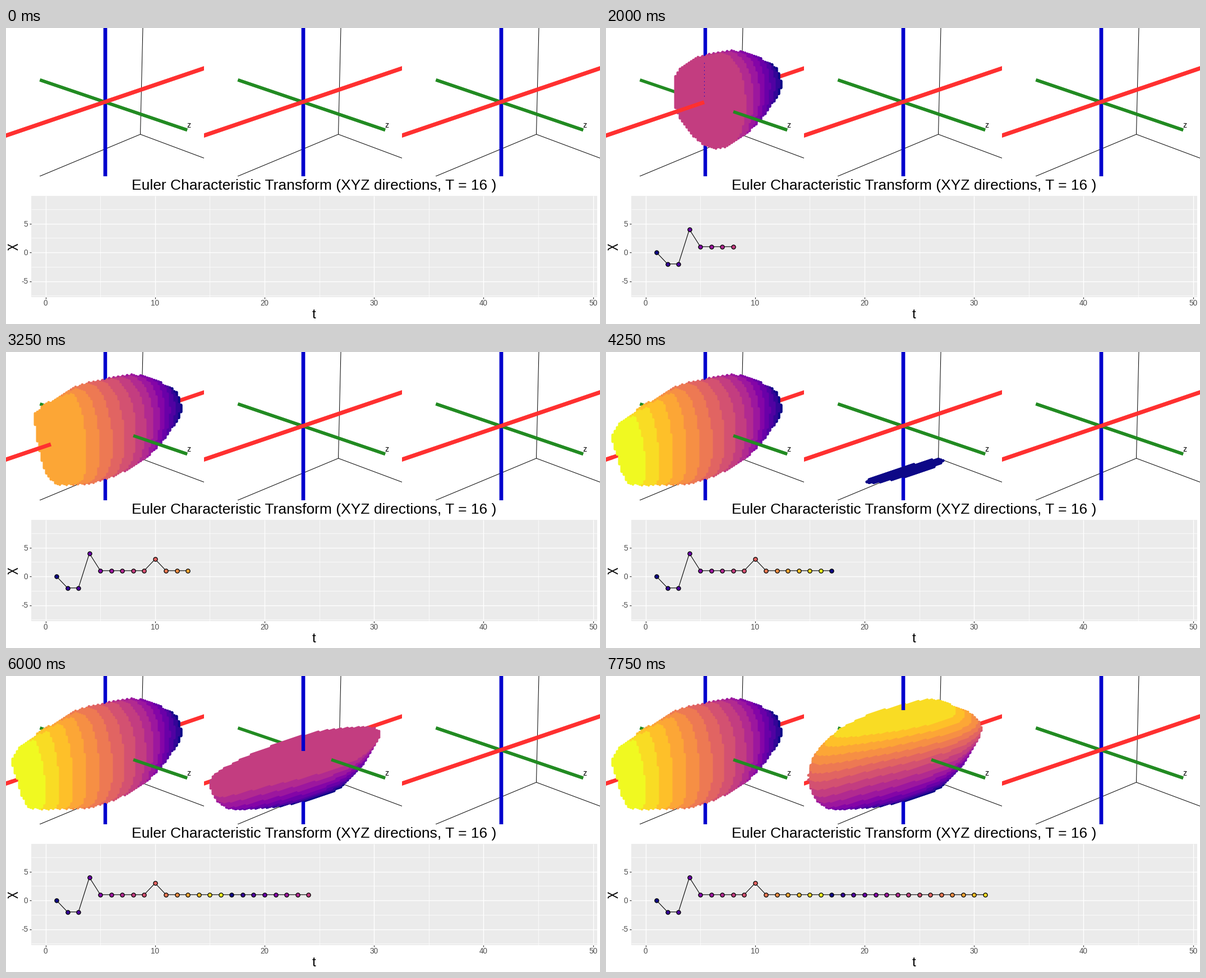
A matplotlib script for the animation above (8 s loop, 1059 by 529 pixels).

```python
import numpy as np
import matplotlib.pyplot as plt
from matplotlib.animation import FuncAnimation
from matplotlib.patches import Rectangle

W, H, DPI = 1059, 529, 64
PT = 72 / DPI                     # points per pixel
PANEL, TOP = 353, 265
STEPS, FRAMES = 16, 32
RED, BLUE, GREEN = "#FF3030", "#0000CD", "#228B22"
ORIGIN = np.array([176.5, 132.0])

plt.rcParams["font.family"] = "Liberation Sans"
plt.rcParams["path.simplify"] = False

fig = plt.figure(figsize=(W / DPI, H / DPI), dpi=DPI, facecolor="white")
ax = fig.add_axes([0, 0, 1, 1])
ax.set(xlim=(0, W), ylim=(H, 0))
ax.axis("off")


def line(x, y, color, px, z, clip=None, **kw):
    kw.setdefault("solid_capstyle", "butt")
    art, = ax.plot(x, y, color=color, lw=px * PT, zorder=z, **kw)
    if clip is not None:
        art.set_clip_path(clip)
    return art


def text(x, y, s, px, color="black", ha="center", **kw):
    kw.setdefault("va", "baseline")
    ax.text(x, y, s, fontsize=px * PT, color=color, ha=ha, zorder=30, **kw)


def shade(i):
    return plt.cm.plasma((i % STEPS) / (STEPS - 1))


# Slice outlines at a few heights, clockwise from the left end.
X_LEVELS = [1, 4, 8, 10, 13, 16]
X_SLICES = [
    [(274, 82), (280, 66), (290, 62), (301, 68), (309, 82), (313, 100),
     (309, 118), (300, 129), (288, 130), (278, 120), (274, 108), (273, 96)],
    [(196, 66), (208, 54), (230, 43), (258, 46), (279, 62), (287, 95),
     (285, 135), (272, 168), (240, 175), (208, 150), (194, 116), (200, 92)],
    [(124, 84), (150, 58), (178, 49), (208, 49), (230, 80), (240, 125),
     (238, 170), (222, 208), (184, 214), (150, 188), (123, 142), (135, 117)],
    [(91, 108), (104, 80), (126, 62), (158, 54), (183, 75), (198, 130),
     (200, 180), (184, 221), (150, 232), (115, 205), (94, 150), (93, 125)],
    [(50, 112), (74, 91), (92, 84), (110, 82), (122, 108), (129, 150),
     (131, 195), (124, 231), (92, 236), (69, 212), (57, 165), (53, 138)],
    [(12, 148), (20, 131), (30, 124), (40, 124), (48, 145), (54, 172),
     (58, 200), (55, 233), (42, 236), (27, 212), (20, 184), (12, 164)],
]
Y_LEVELS = [1, 3, 5, 10, 12, 15]
Y_SLICES = [
    [(109, 232), (132, 221), (167, 209), (207, 198), (237, 191), (250, 194),
     (239, 202), (217, 212), (187, 221), (152, 229), (125, 234)],
    [(45, 230), (67, 210), (127, 182), (197, 158), (257, 146), (285, 150),
     (275, 168), (243, 192), (192, 214), (137, 229), (72, 238)],
    [(27, 218), (47, 190), (117, 153), (197, 127), (267, 122), (297, 127),
     (290, 145), (252, 177), (192, 202), (117, 222), (47, 236)],
    [(12, 160), (39, 145), (107, 115), (192, 87), (267, 74), (307, 78),
     (313, 97), (277, 121), (207, 143), (127, 160), (22, 181)],
    [(19, 142), (42, 121), (117, 88), (192, 65), (252, 57), (295, 66),
     (302, 86), (262, 106), (202, 121), (127, 136), (35, 149)],
    [(61, 97), (77, 88), (122, 67), (187, 49), (227, 42), (261, 52),
     (259, 67), (237, 76), (197, 85), (142, 94), (77, 101)],
]


def hermite(p0, p1, m0, m1, s):
    return ((2 * s**3 - 3 * s**2 + 1) * p0 + (s**3 - 2 * s**2 + s) * m0
            + (3 * s**2 - 2 * s**3) * p1 + (s**3 - s**2) * m1)


def outline(levels, keys, n):
    """Smooth closed outline of the slice at height n."""
    levels = np.array(levels, float)
    keys = np.array(keys, float)
    n = np.clip(n, levels[0], levels[-1])
    i = min(np.searchsorted(levels, n, "right") - 1, len(levels) - 2)
    span = levels[i + 1] - levels[i]
    slope = np.gradient(keys, levels, axis=0) * span
    p = hermite(keys[i], keys[i + 1], slope[i], slope[i + 1],
                (n - levels[i]) / span)
    q = np.roll(p, -1, 0)
    m = (q - np.roll(p, 1, 0)) / 2
    s = np.linspace(0, 1, 10, endpoint=False)[None, :, None]
    curve = hermite(p[:, None], q[:, None], m[:, None],
                    np.roll(m, -1, 0)[:, None], s)
    return curve.reshape(-1, 2)


def grid_rows(curve, u, v):
    """Fill an outline with rows of grid dots running along u, stepped by v."""
    basis = np.array([u, v], float)
    a, b = (curve @ np.linalg.inv(basis)).T
    a2, b2 = np.roll(a, -1), np.roll(b, -1)
    rows = []
    for k in range(int(np.ceil(b.min())), int(b.max()) + 1):
        hit = (b <= k) != (b2 <= k)
        if not hit.any():
            continue
        cross = a[hit] + (a2 - a)[hit] * (k - b[hit]) / (b2 - b)[hit]
        lo, hi = np.ceil(cross.min()), np.floor(cross.max())
        if hi >= lo:
            ends = np.array([(lo, k), (hi + 0.01, k)]) @ basis
            rows += [*ends, (np.nan, np.nan)]
    return np.array(rows).reshape(-1, 2).T


def body(levels, keys, u, v, x0, clip):
    """One group of artists for each threshold, drawn back to front."""
    groups = []
    for n in range(1, STEPS + 1):
        group = []
        for part, h in enumerate((n - 0.5, n)):
            x, y = grid_rows(outline(levels, keys, h), u, v)
            group.append(line(x + x0, y, shade(n - 1), 5, 5 + n / 4 + part / 8,
                              clip, solid_capstyle="round", snap=False))
        groups.append(group)
    return groups


# Scene axes, as (x, y) ends relative to a panel.
AXES = {
    "blue": (BLUE, 6.4, (176.5, -10), (176.5, 275)),
    "green": (GREEN, 5.6, (60.5, 92.8), (323, 182.3)),
    "red": (RED, 7, (-10, 195.6), (363, 68.6)),
}


def on_axis(name, x):
    _, _, p, q = AXES[name]
    return p[1] + (q[1] - p[1]) * (x - p[0]) / (q[0] - p[0])


front = []
clips = []
for j in range(3):
    x0 = j * PANEL
    clip = Rectangle((x0, 0), PANEL, TOP, transform=ax.transData)
    clips.append(clip)
    for end in [(60, 265), (353, 232.5), (244, -1)]:
        line([x0 + 239.5, x0 + end[0]], [190, end[1]], "black", 1, 1, clip)
    parts = {}
    for i, (name, (color, px, p, q)) in enumerate(AXES.items()):
        xs, ys = [x0 + p[0], x0 + q[0]], [p[1], q[1]]
        line(xs, ys, color, px, 2 + i / 10, clip)
        parts[name] = line(xs, ys, color, px, 20 + i / 10, clip)
    front.append(parts)
    text(x0 + 325.5, 178, "z", 14)

specks = line([174.5, 174.5], [62, 126], BLUE, 1, 19, clips[0],
              linestyle=(0, (1.5, 5)))

bodies = [
    body(X_LEVELS, X_SLICES, (0, 4), (4, 1.37), 0, clips[0]),
    body(Y_LEVELS, Y_SLICES, (4, -1.36), (4, 1.37), PANEL, clips[1]),
]


def place(j, name, x_from, x_to):
    xs = np.array([x_from, x_to], float)
    front[j][name].set_data(xs + j * PANEL, on_axis(name, xs))


def pose_axes(j, n):
    """Keep in front only those parts of the axes the body does not cover."""
    past = n >= 8
    _, _, g0, g1 = AXES["green"]
    place(j, "green", 227 if past else g0[0], g1[0])
    if j == 0:
        end = np.interp(n, [1, 4, 8, 13, 16], [285, 237, 175, 80, 12])
        place(0, "red", -10, end if n else 363)
        front[0]["blue"].set_visible(not past)
        specks.set_visible(n == 8)
    elif j == 1:
        front[1]["red"].set_visible(not past)
        end = np.interp(n, [1, 5, 10, 15], [203, 163, 115, 61]) if n else 275
        front[1]["blue"].set_ydata([-10, end])


# Chart
def tx(t):
    return 70.6 + 19.52 * np.asarray(t)


def cy(c):
    return 401.1 - 10.28 * np.asarray(c)


L, R, T, B = 44.5, 1053.5, 300.3, 481.3
ax.add_patch(Rectangle((L, T), R - L, B - T, color="#EBEBEB", lw=0, zorder=1))
for t in range(0, 51, 5):
    line([tx(t)] * 2, [T, B], "white", 0.7 if t % 10 else 1.4, 2)
for c in np.arange(-7.5, 8, 2.5):
    line([L, R], [cy(c)] * 2, "white", 0.7 if c % 5 else 1.4, 2)
for t in range(0, 51, 10):
    line([tx(t)] * 2, [B, B + 3], "#333333", 1.2, 2)
    text(tx(t), 496.3, str(t), 13.5, "#4D4D4D")
for c in (-5, 0, 5):
    line([L - 3, L], [cy(c)] * 2, "#333333", 1.2, 2)
    text(39.5, cy(c) + 4.8, str(c), 13.5, "#4D4D4D", ha="right")
text(549, 288.5, "Euler Characteristic Transform (XYZ directions, T = 16 )", 26.4)
text(548.5, 519, "t", 24)
text(11, 391, "χ", 24, rotation=90, va="center")

times = np.arange(1, FRAMES)
chi = np.ones(FRAMES - 1)
chi[:4] = 0, -2, -2, 4
chi[9] = 3
curve = line([], [], "black", 1.1, 24)
dots = [line([tx(t)], [cy(c)], "black", 1, 25, marker="o",
             markersize=7.2 * PT, markerfacecolor=shade(t - 1),
             markeredgecolor="black", markeredgewidth=1.3 * PT)
        for t, c in zip(times, chi)]


def draw(frame):
    for j, groups in enumerate(bodies):
        n = min(max(frame - j * STEPS, 0), STEPS)
        for k, group in enumerate(groups):
            for art in group:
                art.set_visible(k < n)
        pose_axes(j, n)
    curve.set_data(tx(times[:frame]), cy(chi[:frame]))
    for k, dot in enumerate(dots):
        dot.set_visible(k < frame)
    return []


anim = FuncAnimation(fig, draw, frames=FRAMES, init_func=lambda: draw(0),
                     interval=250, repeat=True, repeat_delay=0, blit=False)
plt.show()
```
